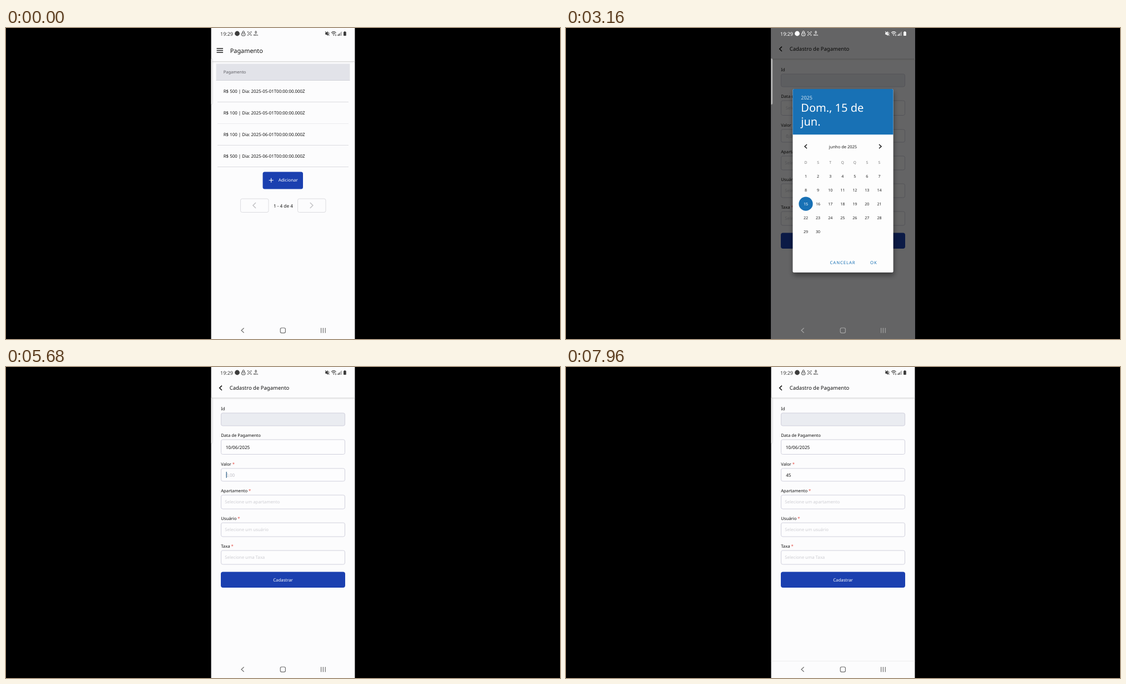
These frames come from a looping animation (998 px wide and 561 px high, 8000 ms). An HTML page:

```html
<!DOCTYPE html>
<html lang="pt-BR">
<head>
<meta charset="utf-8">
<title>Cadastro de Pagamento</title>
<style>
html,body{margin:0;width:100%;height:100%;overflow:hidden;background:#000}
svg{display:block;width:100vw;height:100vh}
text{font-family:"Noto Sans","Open Sans",sans-serif;text-rendering:geometricPrecision;white-space:pre}
</style>
</head>
<body>
<svg id="stage" viewBox="0 0 998 561" xmlns="http://www.w3.org/2000/svg"></svg>
<script>
const LOOP = 8000;
const BLUE = '#1b40b0', SKY = '#1871b5', INK = '#111';

// ---------- drawing helpers ----------
const attrs = o => Object.entries(o).map(([k, v]) => ` ${k}="${v}"`).join('');
const rect = (x, y, w, h, fill, rx = 0, o = {}) =>
  `<rect x="${x}" y="${y}" width="${w}" height="${h}" fill="${fill}" rx="${rx}"${attrs(o)}/>`;
const path = (d, stroke, w = 1, o = {}) =>
  `<path d="${d}" fill="none" stroke="${stroke}" stroke-width="${w}"${attrs(o)}/>`;
const circle = (x, y, r, fill, o = {}) => `<circle cx="${x}" cy="${y}" r="${r}" fill="${fill}"${attrs(o)}/>`;
// y is the middle of the capital letters
const text = (x, y, size, str, fill = INK, o = {}) =>
  `<text x="${x}" y="${(y + size * .357).toFixed(2)}" font-size="${size}" fill="${fill}"${attrs(o)}>${str}</text>`;
const mid = (x, y, size, str, fill, o = {}) => text(x, y, size, str, fill, {'text-anchor': 'middle', ...o});
const group = (id, body, o = {}) => `<g id="${id}"${attrs(o)}>${body}</g>`;
const chevron = (x, y, w, h, color, sw) => path(`M${x + w} ${y - h}L${x} ${y}L${x + w} ${y + h}`, color, sw);

// ---------- list screen ----------
function listScreen() {
  let s = rect(369.5, 0, 259, 561, '#fcfcfd');
  for (const y of [37, 40.5, 44]) s += rect(379.5, y - .7, 11.5, 1.4, INK);
  s += text(403.7, 41, 10.9, 'Pagamento');
  s += rect(369.5, 60, 259, 1, '#d6d6d6') + rect(369.5, 61, 259, 2, '#000', 0, {opacity: .03});
  s += rect(378.5, 64.5, 241, 30, '#e2e3e9') + rect(378.5, 94, 241, 1, '#d3d3da');
  s += text(391.7, 79.7, 7.5, 'Pagamento', '#5d5d63', {'font-weight': 500});
  [[500, 5], [100, 5], [100, 6], [500, 6]].forEach(([v, m], i) => {
    const y = 114 + i * 39;
    s += text(391.7, y, 7.9, `R$ ${v} | Dia: 2025-0${m}-01T00:00:00.000Z`);
    s += rect(381, y + 19, 236, 1, i == 1 ? '#ebebee' : '#dcdce0');
  });
  s += rect(462.5, 259.5, 72.5, 31, BLUE, 3.5);
  s += path('M473.7 274.7H481.7M477.7 270.7V278.7', '#fff', 1.1);
  s += text(490.7, 274, 7.9, 'Adicionar', '#fff');
  for (const x of [422.5, 525.5]) s += rect(x, 308, 50.5, 24.5, 'none', 3, {stroke: '#dcdce0'});
  s += chevron(445, 320, 5, 5, '#c6c6c9', 1.7) + chevron(552.8, 320, -5, 5, '#c6c6c9', 1.7);
  return s + mid(499.4, 320.7, 8.2, '1 - 4 de 4');
}

// ---------- form screen ----------
const FIELDS = [
  ['Id', 75, 83, 23], ['Data de Pagamento', 123, 131, 26.5], ['Valor', 175, 183, 23],
  ['Apartamento', 223, 231, 25], ['Usuário', 273, 281, 25], ['Taxa', 323, 331, 25]
];
function formScreen() {
  let s = rect(369.5, 0, 259, 561, '#fcfcfd');
  s += chevron(384.7, 37.8, 4.2, 4.2, INK, 1.6);
  s += text(402.7, 38, 9.5, 'Cadastro de Pagamento');
  s += rect(369.5, 55.5, 259, 1, '#d2d2d2') + rect(369.5, 56.5, 259, 2, '#000', 0, {opacity: .035});
  FIELDS.forEach(([label, ly, y, h], i) => {
    const star = i > 1 ? '<tspan fill="#e5483f"> *</tspan>' : '';
    s += text(387.2, ly, 7.7, label + star, INK, {'font-weight': 500});
    s += rect(387.5, y, 223, h, i ? '#fdfdfe' : '#eaecf1', 3, {stroke: '#d0d0dc'});
  });
  const hint = '#cdcdd2';
  s += text(395.7, 144.7, 7.8, 'Selecionar data', hint, {id: 'dateHint'});
  s += text(395.7, 144.7, 8.2, '10/06/2025', INK, {id: 'date'});
  s += text(396.3, 195, 8, '0,00', '#bdbdc4', {id: 'value'});
  s += rect(396.6, 189, 1.1, 11, '#17527f', 0, {id: 'caret'});
  s += text(394.3, 243.7, 7.8, 'Selecione um apartamento', hint);
  s += text(394.3, 293.7, 7.8, 'Selecione um usuário', hint);
  s += text(394.3, 343.7, 7.8, 'Selecione uma Taxa', hint);
  s += rect(387, 369.5, 224, 28.5, BLUE, 4);
  return s + mid(499, 384, 7.8, 'Cadastrar', '#fff');
}

// ---------- date dialog ----------
function calendar(day) {
  const at = d => [432 + (d - 1) % 7 * 22.07, 267 + Math.floor((d - 1) / 7) * 25.1];
  let s = chevron(430, 213.7, 4, 3.6, INK, 1.4) + chevron(568, 213.7, -4, 3.6, INK, 1.4);
  s += mid(499, 214, 7.5, 'junho de 2025', '#222');
  [...'DSTQQSS'].forEach((c, i) => s += mid(432 + i * 22.07, 243, 6.8, c, '#777'));
  s += circle(...at(day), 12.6, SKY);
  for (let d = 1; d <= 30; d++) s += mid(...at(d), 7, d, d == day ? '#fff' : '#222');
  s += text(475.5, 423.3, 7.7, 'CANCELAR', SKY, {'letter-spacing': .95});
  return s + text(548, 423.3, 7.7, 'OK', SKY, {'letter-spacing': .95});
}
function dialog(id, top, height, head, day, lines, shift) {
  let s = rect(408.5, top, 181, height, '#fdfdfd', 2.5, {filter: 'url(#shade)'});
  s += path(`M408.5 ${top + head}v${2.5 - head}q0 -2.5 2.5 -2.5h176q2.5 0 2.5 2.5v${head - 2.5}z`, 'none', 0, {style: `fill:${SKY}`});
  s += text(423.3, top + 15.7, 9, '2025', '#d5e5f1');
  lines.forEach((l, i) => s += text(423.3, top + 33.5 + i * 25.3, 20, l, '#fff'));
  const ripple = shift ? rect(546, 411.7, 32, 22, SKY, 4, {id: 'ripple'}) : '';
  return group(id, s + group(id + 'Cal', ripple + calendar(day), {transform: `translate(0 ${shift})`}));
}

// ---------- keyboard ----------
const KEY = '#323232', DARK = '#181818', STEP = 25.13;
const key = (cx, y, h, ch, size) => rect(cx - 10.6, y, 21.2, h, KEY, 3) + mid(cx, y + h / 2, size, ch, '#fafafa');
function keyboard() {
  let s = rect(369.5, 317, 259, 244, '#0c0c0c') + rect(369.5, 317, 259, 25.5, '#202020');
  const w = '#eee';
  // toolbar
  s += path('M388.5 325h7q2 0 2 2v4l-4 4h-5q-2 0 -2 -2v-6q0 -2 2 -2zM397.5 331h-2q-2 0 -2 2v2M389 330q2.5 4 5 .5', w, 1.1);
  s += circle(389.8, 328, .8, w) + circle(394, 328, .8, w);
  s += circle(437, 329.7, 5, 'none', {stroke: w, 'stroke-width': 1.1});
  s += circle(435.2, 328, .8, w) + circle(438.9, 328, .8, w) + path('M434.3 331q2.7 3 5.4 0', w, 1);
  s += rect(479, 324.7, 10, 10, 'none', 1.5, {stroke: w, 'stroke-width': 1.1}) + mid(484, 329.8, 4.6, 'GIF', w, {'font-weight': 700});
  let gear = '';
  for (let i = 0; i < 24; i++) {
    const a = i * Math.PI / 12, r = i % 4 < 2 ? 5.9 : 4.8;
    gear += `${i ? 'L' : 'M'}${(528.5 + r * Math.cos(a)).toFixed(1)} ${(329.7 + r * Math.sin(a)).toFixed(1)}`;
  }
  s += path(gear + 'Z', w, 1.1, {'stroke-linejoin': 'round'}) + circle(528.5, 329.7, 1.8, 'none', {stroke: w});
  s += rect(572, 324, 4, 7, w, 2) + path('M570 329q0 4 4 4t4 -4M574 333v3', w, 1.1);
  for (const x of [609, 613, 617]) s += circle(x, 330.3, 1.1, w);
  s += circle(618, 324.8, 1.9, '#f0602f');
  // keys
  [...'1234567890'].forEach((c, i) => s += key(386 + i * STEP, 348, 26, c, 12.5));
  [...'QWERTYUIOP'].forEach((c, i) => s += key(386 + i * STEP, 378.5, 31.5, c, 14));
  [...'ASDFGHJKL'].forEach((c, i) => s += key(398.3 + i * STEP, 415.5, 31.5, c, 14));
  [...'ZXCVBNM'].forEach((c, i) => s += key(423.3 + i * STEP, 452.8, 31.5, c, 14));
  s += rect(375, 452.8, 30.5, 31.5, DARK, 3) + rect(592.5, 452.8, 30.5, 31.5, DARK, 3);
  s += path('M390 462.5L396 468.7H393V474.5H387V468.7H384Z', '#4b8dea', 1.3, {'stroke-linejoin': 'round'});
  s += path('M604.5 464H614.5V473.2H604.5L600.8 468.6ZM606.2 466.4L610.6 470.8M610.6 466.4L606.2 470.8', w, 1.1);
  s += rect(375, 489.7, 34.5, 31.5, DARK, 3) + mid(392, 505.5, 12, '!#1', w);
  s += key(423.5, 489.7, 31.5, ',', 16) + key(574.5, 489.7, 31.5, '.', 16);
  s += rect(438, 489.7, 122, 31.5, KEY, 3) + mid(499, 506, 7.9, 'Português (BR)', w);
  s += chevron(453, 505.5, 2.8, 2.8, w, 1.1) + chevron(545, 505.5, -2.8, 2.8, w, 1.1);
  s += rect(589, 489.7, 34, 31.5, DARK, 3) + mid(606, 506, 9, 'OK', '#4b8dea');
  // pressed key with its bubble, drawn for "4" and moved for others
  const press = rect(450.8, 348, 21.2, 26, '#4b4b43', 3) + rect(442, 292.5, 39, 50, '#242424', 4);
  s += group('press', press + mid(461.4, 361, 12.5, '', w, {id: 'pressKey'}) + mid(461.4, 319, 22, '', '#fff', {id: 'pressBig'}));
  // grid icon beside the system buttons
  for (let r = 0; r < 3; r++) for (let c = 0; c < 6; c++) s += rect(605.3 + c * 2.3, 542.3 + r * 2.4, 1.4, 1.3, '#999');
  return s + rect(607.5, 549, 8, 1.2, '#999');
}

// ---------- system bars, tinted through currentColor ----------
const C = 'currentColor';
function statusBar() {
  let s = text(386, 10.6, 9, '19:29', C);
  s += circle(416.5, 10, 4.4, C);
  s += rect(424.7, 9, 6, 5, 'none', 1, {stroke: C}) + path('M426 9V7.5q0 -2 1.7 -2t1.7 2V9', C, 1) + circle(427.7, 11.5, .7, C);
  s += path('M435.5 8.3V6.7H437M440.5 6.7H442V8.3M442 11.8V13.3H440.5M437 13.3H435.5V11.8', C, .9);
  s += group('scan', rect(437.2, 8.5, 3.2, 3.2, 'none', 1, {stroke: C, 'stroke-width': .9}));
  s += mid(450, 7.8, 6.4, '0', C, {id: 'speed', 'font-weight': 600}) + mid(450, 12.7, 3.7, 'KB/s', C, {'font-weight': 600});
  s += path('M575.5 8.5H577L579.5 6.5V13.5L577 11.5H575.5Z', C, .6, {style: 'fill:currentColor'});
  s += path('M575 6L582.5 14M581 7.5q1.6 2.5 0 5', C, 1);
  s += path('M586 8.6q4.3 -4 8.6 0M587.6 10.6q2.7 -2.4 5.4 0', C, 1.1) + circle(590.3, 12.6, 1, C) + path('M594 11v3M592.8 13l1.2 1.2 1.2 -1.2', C, .7);
  for (let i = 0; i < 4; i++) s += rect(597.5 + i * 2, 12 - i * 1.8, 1.3, 2 + i * 1.8, C, 0, {opacity: i > 1 ? .5 : 1});
  return s + rect(608, 7, 4.8, 7, C, .8) + rect(609.4, 6, 2, 1.5, C);
}
function navBar() {
  let s = group('back', chevron(424, 545.5, 4.6, 4.3, C, 1.2));
  s += group('down', path('M421.7 543.2L426.5 548L431.3 543.2', C, 1.2));
  s += rect(494.2, 541, 9.2, 9.2, 'none', 2.6, {stroke: C, 'stroke-width': 1.2});
  for (const x of [567.6, 571.4, 575.2]) s += rect(x - .6, 541, 1.2, 9.2, C);
  return s;
}

const stage = document.getElementById('stage');
stage.innerHTML =
  `<defs><clipPath id="phone">${rect(369.5, 0, 259, 561, '#fff')}</clipPath>
  <filter id="shade" x="-20%" y="-20%" width="140%" height="140%">
  <feDropShadow dx="1" dy="5" stdDeviation="5" flood-color="#000" flood-opacity=".42"/></filter></defs>` +
  rect(0, 0, 998, 561, '#000') +
  group('screen',
    rect(369.5, 0, 259, 561, '#fcfcfd') + group('list', listScreen()) + group('form', formScreen()) +
    rect(369.5, 530, 259, 1, '#ececef', 0, {id: 'navLine'}) +
    rect(369.5, 0, 259, 561, '#000', 0, {id: 'dim'}) +
    rect(367, 55, 5, 83, '#fff', 2, {stroke: '#aaa', 'stroke-width': .8, opacity: .6}) +
    group('picker', dialog('before', 110, 331, 82.3, 15, ['Dom., 15 de', 'jun.'], 0) +
      dialog('after', 122.7, 305.5, 57, 10, ['Ter., 10 de jun.'], -12.7)) +
    group('keys', keyboard()) + group('status', statusBar()) + group('nav', navBar()),
    {'clip-path': 'url(#phone)'});

// ---------- animation ----------
const el = id => document.getElementById(id);
const ramp = (t, a, b) => Math.min(1, Math.max(0, (t - a) / (b - a)));
const out = (p, n) => 1 - (1 - p) ** n;
const set = (id, k, v) => el(id).setAttribute(k, v);
const show = (id, on) => set(id, 'display', on ? 'inline' : 'none');
const move = (id, x, y = 0) => set(id, 'transform', `translate(${x.toFixed(2)} ${y.toFixed(2)})`);
const gray = v => `rgb(${[v, v, v].map(Math.round)})`;
const mix = (a, b, p) => a + (b - a) * p;

const PRESSES = [[6640, 6770, '4', 0], [6960, 7090, '5', 1]];

function draw(t) {
  // list to form
  const slide = out(ramp(t, 945, 1400), 4);
  const gone = ramp(t, 980, 1063);
  move('list', -26 * slide);
  move('form', 26 * (1 - slide));
  set('list', 'opacity', 1 - gone);
  set('form', 'opacity', ramp(t, 995, 1078));
  show('list', gone < 1);

  // date dialog
  const dim = ramp(t, 2180, 2400) * (1 - ramp(t, 4520, 4715));
  const seen = ramp(t, 2160, 2305) * (1 - ramp(t, 4520, 4695));
  const picked = t >= 3520;
  set('dim', 'opacity', .6 * dim);
  set('picker', 'opacity', seen);
  show('picker', seen > 0);
  show('before', !picked);
  show('after', picked);
  set('ripple', 'opacity', .17 * ramp(t, 4190, 4360));

  // field contents
  const done = t >= 4540;
  show('dateHint', !done);
  show('date', done);
  const typed = t >= 7040 ? '45' : t >= 6720 ? '4' : '';
  el('value').textContent = typed || '0,00';
  set('value', 'fill', typed ? INK : '#bdbdc4');
  const since = typed ? t - (typed == '4' ? 6720 : 7040) : t - 5600;
  show('caret', t >= 5600 && t < 7620 && since % 1000 < 500);
  set('caret', 'x', 396.6 + typed.length * 4.6);

  // keyboard
  const up = out(ramp(t, 5720, 6020), 3) * (1 - ramp(t, 7620, 7880) ** 2);
  show('keys', up > 0);
  move('keys', 0, 244 * (1 - up));
  const press = PRESSES.find(([a, b]) => t >= a && t < b);
  show('press', !!press);
  if (press) {
    move('press', press[3] * STEP);
    el('pressKey').textContent = el('pressBig').textContent = press[2];
  }
  const open = t >= 5720 && t < 7640;
  show('down', open);
  show('back', !open);
  show('navLine', t >= 7880);

  // system bars
  const light = t < 3500 ? ramp(dim, .3, .8) : ramp(dim, .35, 1);
  set('status', 'color', gray(mix(60, 255, light)));
  set('nav', 'color', gray(mix(mix(110, 165, light), 155, up)));
  const busy = t >= 1800 && t < 2800;
  el('speed').textContent = busy ? '7' : '0';
  show('scan', !busy);
}

function tick() {
  draw(performance.now() % LOOP);
  requestAnimationFrame(tick);
}
tick();
</script>
</body>
</html>
```
